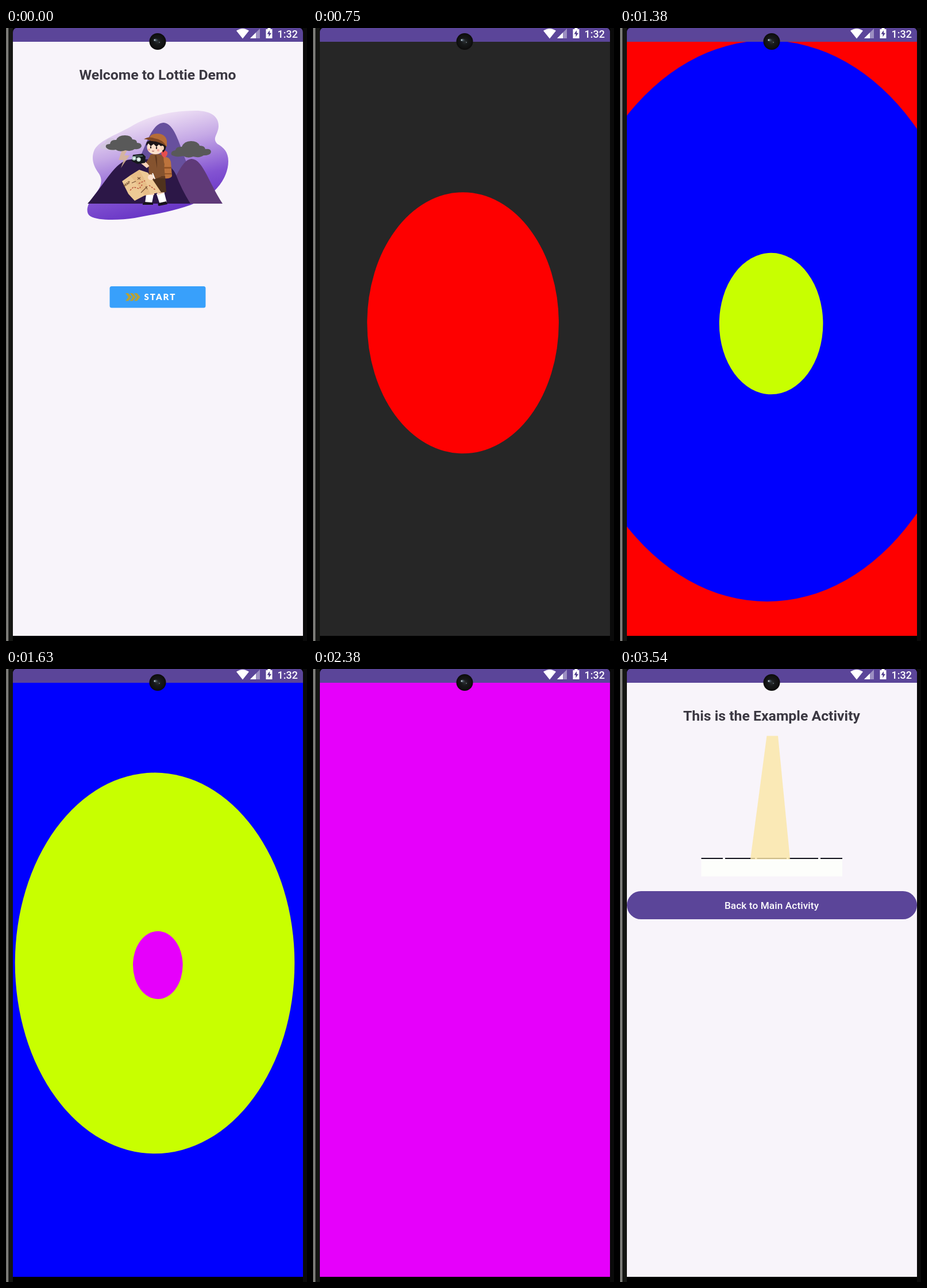
An HTML page that plays this animation: 524 by 1068 pixels, repeating every 3580 ms.

```html
<!DOCTYPE html>
<html lang="en">
<head>
<meta charset="utf-8">
<title>Screen transitions</title>
<style>
html, body { margin: 0; width: 100%; height: 100%; overflow: hidden; background: #000; }
svg { display: block; width: 100%; height: 100%; }
text { font-family: Roboto, sans-serif; }
.title { font-size: 24.8px; font-weight: 700; fill: #3b3842; text-anchor: middle; }
.label { font-size: 17.2px; font-weight: 500; fill: #fff; text-anchor: middle; letter-spacing: .1px; }
.start { font: 900 15px Lato, sans-serif; letter-spacing: 2px; fill: #fff; }
.clock { font-size: 18px; font-weight: 500; fill: #fff; }
</style>
</head>
<body>
<svg viewBox="0 0 524 1068" preserveAspectRatio="none">
<defs>
  <clipPath id="screen"><path d="M12 1068V8Q12 2 17 0H512Q517 2 517 8V1068Z"/></clipPath>
  <clipPath id="page"><rect x="12" y="24" width="505" height="1035"/></clipPath>
  <linearGradient id="sky" x1=".3" y1="0" x2=".62" y2="1">
    <stop offset=".06" stop-color="#f3e6f6"/><stop offset=".35" stop-color="#c6aae6"/>
    <stop offset=".68" stop-color="#8353d2"/><stop offset=".9" stop-color="#6a37c6"/>
  </linearGradient>
  <linearGradient id="edge" x1="0" x2="1" y1="0" y2="0">
    <stop offset="0" stop-color="#6c6c68"/><stop offset=".8" stop-color="#868682"/><stop offset="1" stop-color="#333"/>
  </linearGradient>
  <radialGradient id="lens"><stop offset="0" stop-color="#2c3033"/><stop offset=".45" stop-color="#17191a"/><stop offset="1" stop-color="#101010"/></radialGradient>
</defs>

<rect width="524" height="1068" fill="#000"/>
<rect x="5" width="7" height="1068" fill="#151613"/>
<rect width="4.6" height="1068" fill="url(#edge)"/>
<rect x="517" width="7" height="1068" fill="#0a0a0a"/>
<rect x="12" y="1059" width="505" height="9" fill="#000"/>

<g clip-path="url(#screen)">
  <g id="welcome">
    <rect x="12" width="505" height="24.5" fill="#5b4599"/>
    <rect x="12" y="24" width="505" height="1035" fill="#f8f4fa"/>
    <text class="title" x="264" y="90">Welcome to Lottie Demo</text>

    <path fill="url(#sky)" d="M330 144C356 144 371 154 370 172C369 186 358 192 368 202C379 208 387 216 387 232C387 256 371 284 340 300C310 316 262 324 224 331C198 335 160 336 147 328C138 322 141 309 149 298C160 283 172 271 162 254C151 239 148 226 154 212C164 194 196 185 222 169C252 152 292 144 330 144Z"/>
    <path fill="#67509d" d="M214 262C239 226 249 166 274 165C300 166 306 232 334 274V290H214Z"/>
    <path fill="#5f3a78" d="M268 306C294 270 304 229 323 228C343 229 352 268 377 306Z"/>
    <path fill="#2c1747" d="M142 306C175 268 190 231 217 229C252 226 287 232 296 256Q305 280 321 306Z"/>
    <path id="mist" fill="#d3c7de" opacity=".8" d="M164 209Q163 203 172 201Q176 190 187 192L201 213Q178 215 164 209Z"/>
    <path id="bolt" fill="#d9b795" d="M202 213H211L206 222H215L200 244L205 230H196Z" opacity=".85"/>
    <g id="clouds" fill="#595959">
      <path d="M174 208Q172 202 181 202Q182 194 192 195Q195 187 207 187Q218 187 220 194Q228 194 228 200Q236 200 236 206Q234 212 224 211Q217 216 208 213Q198 217 191 212Q179 214 174 208Z"/>
      <path d="M288 221Q286 214 295 213Q296 206 306 207Q310 197 322 197Q334 197 337 205Q346 205 347 211Q357 210 357 216Q356 222 344 222Q337 227 326 224Q316 228 309 223Q295 226 288 221Z"/>
    </g>

    <g id="hiker">
      <path fill="#bd743d" d="M273 224Q285 224 287 233L289 258Q287 263 275 262Z"/>
      <path fill="#955527" d="M275 242H288V245H275ZM276 253H289V255H276Z"/>
      <path fill="#fff" d="M244 290H257L254 305H242ZM262 289L275 285L280 304L268 307Z"/>
      <path fill="#17131a" d="M241 303L256 304V308H238Q237 306 241 303ZM266 305L279 302L281 307L266 310Q263 308 266 305Z"/>
      <path fill="#fbd5ba" d="M246 281H258V291H244ZM262 281H275L276 287L264 291Z"/>
      <path fill="#4f321d" d="M251 258H277L279 286L262 287L260 276L257 287H243Z"/>
      <path fill="#85532f" d="M251 221Q261 217 274 222L277 262H250Q246 240 251 221Z"/>
      <path fill="#623a20" d="M262 222L269 262H266L259 222ZM250 258H277V262H250Z"/>
      <path fill="#e64f4e" d="M270 215Q276 211 281 216Q282 222 276 226Q270 224 270 215Z"/>
      <path fill="#fbd5ba" d="M251 226L245 235L237 230L234 235L245 244L254 237Z"/>
      <path fill="#85532f" d="M252 222L244 234L250 241L260 233Z"/>
      <g fill="#15181b"><path d="M221 221L238 219L243 224L242 235L229 237L219 232Z"/></g>
      <path fill="#49665d" d="M225 222H238V224H225Z"/>
      <circle cx="223" cy="227" r="3.7" fill="#a9c9c2"/><circle cx="231" cy="229" r="3.7" fill="#c7ddd5"/>
      <circle cx="223" cy="227" r="1.6" fill="#fff"/><circle cx="231" cy="229" r="1.6" fill="#fff"/>
      <ellipse cx="260" cy="208" rx="14.5" ry="12" fill="#fde0cb"/>
      <path fill="#1b1518" d="M244 205Q243 196 253 196L278 198Q281 211 273 217L271 207L266 203L262 207L257 202L252 206L248 201Z"/>
      <ellipse cx="272" cy="209" rx="3" ry="4" fill="#fbd5ba"/>
      <ellipse cx="252" cy="208" rx="1.2" ry="2.1" fill="#211719"/><ellipse cx="262" cy="209" rx="1.2" ry="2.1" fill="#211719"/>
      <circle cx="249" cy="212" r="2" fill="#f8ae9f"/><circle cx="265" cy="213" r="2.2" fill="#f8ae9f"/>
      <path d="M254 214Q256 216 258 214" fill="none" stroke="#a34e43"/>
      <path fill="#b66d37" d="M249 193Q251 184 263 184Q277 184 280 196V207Q269 196 249 193Z"/>
      <path fill="#7f4825" d="M240 194Q247 188 258 192Q273 194 280 207Q267 197 253 197Q244 193 240 194Z"/>
      <path fill="#edc995" d="M202 267L216 257L232 247L247 252L270 286L254 289L241 292L224 301L213 289Z"/>
      <path fill="#dbaa70" d="M216 257L232 247L243 267L251 289L241 292Q230 273 216 257Z" opacity=".4"/>
      <path d="M216 283L222 277L232 280L237 273M231 271L242 266M249 274L260 282" fill="none" stroke="#b9523b" stroke-width="1.5" stroke-dasharray="3 2"/>
      <path d="M229 260L234 264M234 260L229 264M243 276L246 281M235 287L246 276M219 270L226 267" stroke="#775034" stroke-width="1.2"/>
      <text x="206" y="277" font-size="6" font-weight="700" fill="#694329" transform="rotate(-34 206 277)">MAP</text>
      <path fill="#85532f" d="M263 225Q274 225 276 238L270 259L257 264L252 255L263 249Z"/>
      <circle cx="252" cy="260" r="5" fill="#fde0cb"/>
      <path d="M255 253L259 263" stroke="#fff" stroke-width="2"/>
    </g>

    <rect x="180.5" y="450" width="167" height="37.5" rx="3.5" fill="#38a0fb"/>
    <g id="arrows" fill="#b7a137"></g>
    <text class="start" x="240.5" y="474">START</text>
  </g>

  <g id="splash">
    <rect x="12" width="505" height="24.5" fill="#5b4599"/>
    <rect x="12" y="24" width="505" height="1035" fill="#262626"/>
    <g id="rings" clip-path="url(#page)"></g>
  </g>

  <g id="example">
    <rect x="12" width="505" height="24.5" fill="#5b4599"/>
    <rect x="12" y="24" width="505" height="1035" fill="#f8f4fa"/>
    <text class="title" x="264" y="90">This is the Example Activity</text>
    <rect x="141.5" y="330" width="245.5" height="31.5" fill="#fdfefb"/>
    <path d="M141.5 330H179M183 330H235M238.5 330H290M293.5 330H345M349 330H387" stroke="#11101b" stroke-width="2.2"/>
    <path id="beam" fill="#fce6a6" opacity=".8"/>
    <rect x="12" y="387" width="505" height="49" rx="24.5" fill="#5b4599"/>
    <text class="label" x="264" y="418">Back to Main Activity</text>
  </g>
  <rect id="shade" x="12" width="505" height="11" fill="#4d3d78"/>

  <path fill="#fff" d="M412 18.5L401 4.8Q412 -3 423 4.8Z"/>
  <path fill="#fff" opacity=".4" d="M442 1V18H425Z"/>
  <path fill="#fff" d="M435 8V18H425Z"/>
  <path fill="#fff" d="M452.5 2H455.5V0H460.5V2H463.5V18H452.5Z"/>
  <path fill="#4f3b8b" d="M459 4L454.5 10.5H457.5V15.5L462 8.8H459Z"/>
  <text class="clock" x="472.5" y="16.5">1:32</text>
</g>

<circle cx="264" cy="23.5" r="14.5" fill="#0d0d0d"/>
<circle cx="264" cy="23.5" r="12.5" fill="url(#lens)"/>
<ellipse cx="260" cy="21" rx="3.5" ry="2.5" fill="#50606b" opacity=".7"/>
<circle cx="259" cy="21" r="1.2" fill="#c5d2da"/><circle cx="267" cy="25" r="1" fill="#66727a"/>
</svg>
<script>
const LOOP = 3580, OPEN_SPLASH = 240, OPEN_EXAMPLE = 2820;
const RING_START = 360, RING_GAP = 392;
// Ring age in ms and horizontal radius
const GROWTH = [[0, 0], [94, 43], [328, 120.5], [390, 166], [486, 242.5], [720, 432], [900, 580]];
const COLORS = ['#fe0000', '#0000fe', '#c8ff00', '#e600fb'];
const $ = id => document.getElementById(id);
const clamp = x => Math.max(0, Math.min(1, x));
const mix = (a, b, p) => a + (b - a) * p;

function add(parent, tag, attrs) {
  const el = document.createElementNS('http://www.w3.org/2000/svg', tag);
  for (const key in attrs) el.setAttribute(key, attrs[key]);
  return parent.appendChild(el);
}

const rings = COLORS.map(fill => add($('rings'), 'ellipse', { fill }));
for (let i = 0; i < 3; i++) {
  add($('arrows'), 'path', { d: 'M0 0H5L10.5 6.7L5 13.4H0L5 6.7Z', transform: `translate(${208 + i * 7.6} 462)` });
}

function radius(age) {
  if (age <= 0) return 0;
  for (let i = 1; i < GROWTH.length; i++) {
    const [a, from] = GROWTH[i - 1], [b, to] = GROWTH[i];
    if (age < b) return mix(from, to, (age - a) / (b - a));
  }
  return GROWTH[GROWTH.length - 1][1];
}

// Window opening: quick fade in with a decelerating slide up
function openPage(id, age) {
  const el = $(id), visible = age >= 10;
  el.style.display = visible ? '' : 'none';
  if (!visible) return;
  el.setAttribute('transform', `translate(0 ${88 * (1 - clamp(age / 350)) ** 5})`);
  el.setAttribute('opacity', 1 - (1 - clamp(age / 200)) ** 3.6);
}

function draw(t) {
  openPage('splash', t - OPEN_SPLASH);
  openPage('example', t - OPEN_EXAMPLE);

  rings.forEach((ring, i) => {
    const rx = radius(t - RING_START - i * RING_GAP), ry = rx * 1.364;
    ring.setAttribute('rx', rx);
    ring.setAttribute('ry', ry);
    ring.setAttribute('cx', 265.5 - rx * .0266);
    ring.setAttribute('cy', 516.6 - ry * .0125);
  });

  const p = (t - 2920) / 620;
  const x = [[256, 255.5], [259, 275], [262, 296], [252, 227]].map(([a, b]) => mix(a, b, p));
  $('beam').setAttribute('d', `M${x[0]} 116.5H${x[1]}L${x[2]} 331.5H${x[3]}Z`);

  const age = t - OPEN_EXAMPLE;
  $('shade').setAttribute('opacity', age < 10 ? 0 : .9 * (1 - clamp((age - 100) / 150)));
}

function tick(now) {
  draw(now % LOOP);
  requestAnimationFrame(tick);
}
draw(0);
requestAnimationFrame(tick);
</script>
</body>
</html>
```
